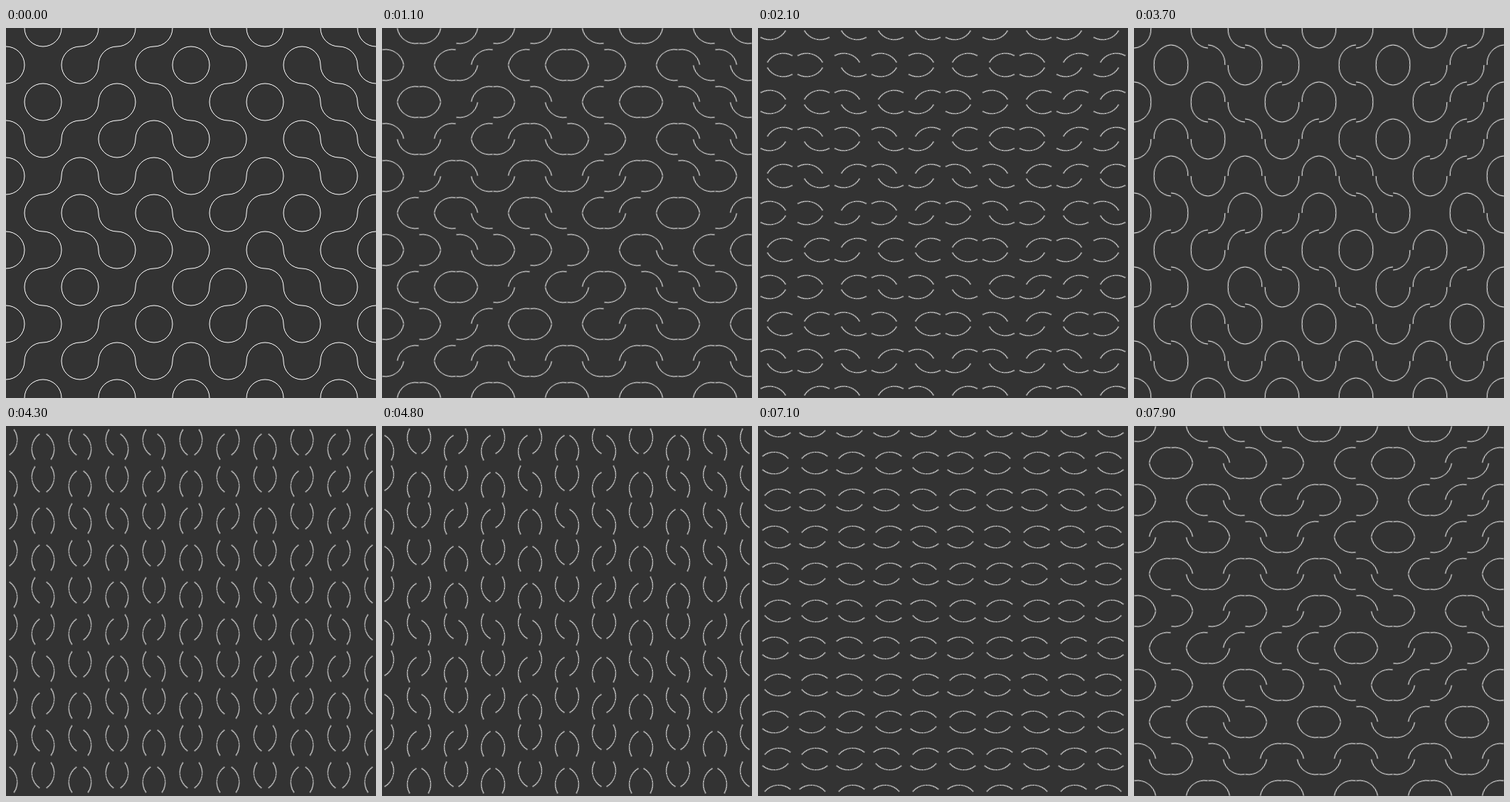
An HTML page for the animation above (8 s loop, 500x500 px).

```html
<!DOCTYPE html>
<html lang="en">
<head>
<meta charset="utf-8">
<title>Turning arc tiles</title>
<style>
  html, body { margin: 0; width: 100%; height: 100%; overflow: hidden; background: #333; }
  svg { display: block; width: 100vw; height: 100vh; }
  path {
    fill: none;
    stroke: #fff;
    stroke-width: 1;
    transform-origin: 0 0;
    /* the 1 ms lead keeps steps clear of rounding at their boundaries */
    animation: turn 8s -1ms infinite;
  }
  /* rest for 1 s, then a quarter turn in 5 degree steps of 100 ms */
  @keyframes turn {
    0%     { transform: rotate(0deg);   animation-timing-function: step-end; }
    12.5%  { transform: rotate(5deg);   animation-timing-function: steps(17, end); }
    33.75% { transform: rotate(90deg);  animation-timing-function: step-end; }
    46.25% { transform: rotate(95deg);  animation-timing-function: steps(17, end); }
    67.5%  { transform: rotate(180deg); animation-timing-function: step-end; }
    80%    { transform: rotate(185deg); animation-timing-function: steps(16, end); }
    100%   { transform: rotate(265deg); }
  }
</style>
</head>
<body>
<svg viewBox="0 0 500 500"></svg>
<script>
  const SVG_NS = 'http://www.w3.org/2000/svg';
  const TILE = 50;
  const ARCS = 'M0-25A25 25 0 0 1-25 0M25 0A25 25 0 0 0 0 25';

  // 1 marks a mirrored tile, which also turns the other way
  const rows = [
    '1000011011',
    '0101100111',
    '1000111011',
    '1010100111',
    '0010100010',
    '1111110100',
    '0010001111',
    '1100100110',
    '0001010101',
    '0101010101'
  ];

  const add = (parent, name, attribute, value) => {
    const node = document.createElementNS(SVG_NS, name);
    node.setAttribute(attribute, value);
    return parent.appendChild(node);
  };

  const stage = document.querySelector('svg');
  rows.forEach((row, r) => [...row].forEach((mirrored, c) => {
    const x = (c + 0.5) * TILE;
    const y = (r + 0.5) * TILE;
    const flip = mirrored === '1' ? -1 : 1;
    const tile = add(stage, 'g', 'transform', `translate(${x} ${y}) scale(${flip} 1)`);
    add(tile, 'path', 'd', ARCS);
  }));
</script>
</body>
</html>
```
